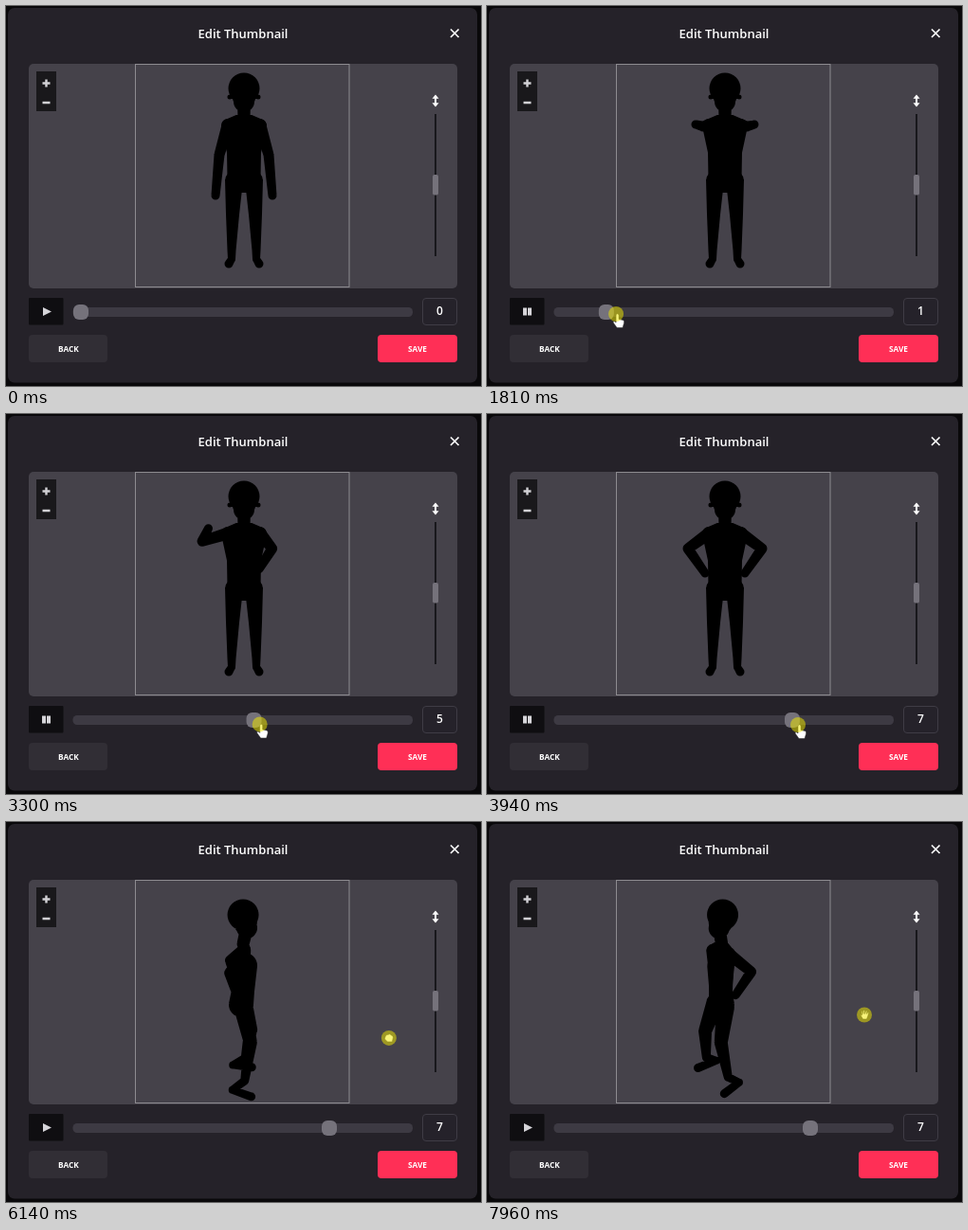
Animation, 501 px wide and 401 px high, one loop 8 s. Source, as an HTML page:

```html
<!DOCTYPE html>
<html lang="en">
<head>
<meta charset="utf-8">
<title>Edit Thumbnail</title>
<style>
  html, body { margin: 0; width: 100%; height: 100%; overflow: hidden; background: #09080a; }
  svg { display: block; width: 501px; height: 401px; }
  text { font-family: "Open Sans", "Noto Sans", sans-serif; fill: #fff; text-anchor: middle; }
  .button { font-size: 8.3px; font-weight: 700; }
</style>
</head>
<body>
<svg viewBox="0 0 501 401">
  <rect x="2" y="2" width="495" height="395.500" rx="7" fill="#252229"/>
  <text x="250" y="34" font-size="13" font-weight="600">Edit Thumbnail</text>
  <path d="M469 24.500l8.500 8.500m0-8.500l-8.500 8.500" stroke="#fff" stroke-width="1.700"/>

  <rect x="24" y="61" width="452" height="237" rx="5" fill="#45424a"/>
  <rect x="136.500" y="61.500" width="225.500" height="235" fill="none" stroke="#8d8b90"/>
  <rect x="32" y="69" width="21" height="42" fill="#19181b"/>
  <path d="M38.500 81.500h8M42.500 77.500v8M38.500 102h8" stroke="#d2d1d5" stroke-width="2.400"/>

  <path d="M453 93.500l3.500 4.300h-2.500v4.400h2.500l-3.500 4.300l-3.500-4.300h2.500v-4.400h-2.500z" fill="#fff"/>
  <path d="M453 114v150" stroke="#19181c" stroke-width="2"/>
  <rect x="450" y="178" width="6" height="21.500" rx="2" fill="#75727b"/>

  <path id="torso" stroke="#000" stroke-width="14" stroke-linejoin="round"/>
  <path id="limbs"/>

  <rect x="24" y="308" width="36.500" height="28.500" rx="1" fill="#0f0e11"/>
  <path id="toggle" fill="#d6d5d9"/>
  <rect x="70.500" y="318" width="358.500" height="10" rx="4.500" fill="#3d3a43"/>
  <rect id="knob" y="315" width="16" height="16" rx="6" fill="#75727b"/>
  <rect x="439.500" y="308.500" width="36" height="28" rx="3.500" fill="#25222a" stroke="#3f3c45"/>
  <text id="count" x="457.500" y="326.300" font-size="12" font-weight="600"></text>

  <rect x="24" y="347" width="83" height="29" rx="4" fill="#312e35"/>
  <text class="button" x="66" y="364.800">BACK</text>
  <rect x="392" y="347" width="84" height="29" rx="4" fill="#ff2f56"/>
  <text class="button" x="434" y="364.800">SAVE</text>

  <g id="cursor">
    <path id="pointer" fill="#fff" stroke="#222" stroke-width=".5"/>
    <circle id="press" r="8" fill="#f0e800" fill-opacity=".52"/>
  </g>
</svg>
<script>
const DURATION = 8000;
const scrub = { start: 1450, end: 4500, lag: 65 };
const turns = [{ start: 5450, end: 6850 }, { start: 7250, end: DURATION }];
const RADIANS_PER_PIXEL = 1.4 * Math.PI / 180;

const $ = id => document.getElementById(id);
const clamp = (v, low, high) => Math.min(high, Math.max(low, v));
const ease = u => u * u * (3 - 2 * u);
const during = ({ start, end }, t) => t >= start && t < end;

// One half of the body, [outward, down, forward]; the other half is mirrored.
const body = {
  skull: [0, 87, 2], jaw: [0, 101, 6], ear: [15, 96, 2], neck: [0, 118, 2],
  chest: [0, 141, 3], belly: [0, 168, 2], pelvis: [0, 184, 0],
  shoulder: [17, 126, 3], waist: [11, 154, 2], hip: [10.5, 184, 2],
  knee: [12, 220, 10], ankle: [13, 258, 4], heel: [13, 267, -9], toe: [16, 272, 11]
};

// Elbow and hand of each way to hold an arm.
const hold = {
  down: [[26, 157, 0], [30, 200, 2]],
  forward: [[23, 127, 25], [31, 125, 48]],
  raised: [[48, 128, 0], [51, 82, 4]],
  tucked: [[22, 142, -8], [12, 160, -8]],
  onHip: [[39, 142, -12], [21, 168, -4]]
};
const armTrack = [[1450, "down", "down"], [1810, "forward", "forward"],
  [2780, "raised", "tucked"], [3940, "onHip", "onHip"]]
  .map(([t, left, right]) => [t, [...hold[left], ...hold[right]].flat()]);

// Bones with the radius at each end.
const bones = [
  ["skull", "jaw", 16.5, 11], ["ear", "ear", 2.5, 2.5], ["jaw", "neck", 7, 6.5],
  ["chest", "belly", 14, 12], ["belly", "pelvis", 12, 13],
  ["neck", "shoulder", 6, 6.5], ["shoulder", "elbow", 6.5, 5.5], ["elbow", "hand", 5.5, 4.5],
  ["hip", "knee", 9.5, 7], ["knee", "ankle", 7, 4.5], ["ankle", "heel", 4.5, 4], ["heel", "toe", 4, 4.5]
];

const cursorTrack = [[510, [477, 400]], [1190, [79, 325]], [1450, [79, 325]], [1810, [136, 325]],
  [2780, [218.5, 327]], [3940, [328, 328]], [4500, [341, 331]], [4800, [341, 331]],
  [5450, [340, 222]], [6200, [405, 228]], [6850, [456, 222]], [7250, [300, 206]], [7960, [398, 203.5]]];

const shapes = {
  arrow: "M0 0v11l2.600-2.300l2 4.300l2-1l-2-4h3.400z",
  finger: "M0 1Q1.500-1.500 3 1V5.500l4.500 1q1.500.5 1 3l-1.500 5h-6l-4-5.500q0-2 2-1l1 1z",
  fist: "M-4-1q1-3 3-2.500q2-1.500 3.500.5q2 0 2 2.500l-1 4.500h-5l-3-3z",
  palm: "M-4.500-.5l2 .8l-.5-4.300h1.200l.7 3v-4h1.300l.4 4l1-3.500h1.200l-.3 3.500l1.300-2h1l-1 4l-1.300 3.500h-4z"
};
const playIcon = "M39 318l9 4.500l-9 4.500z";
const pauseIcon = "M38 318.500h4v8h-4zM43 318.500h4v8h-4z";

function sample(track, t, easing = u => u) {
  const next = track.findIndex(key => key[0] > t);
  if (next === 0) return track[0][1];
  if (next < 0) return track[track.length - 1][1];
  const [t0, from] = track[next - 1], [t1, to] = track[next];
  const u = easing((t - t0) / (t1 - t0));
  return from.map((v, i) => v + (to[i] - v) * u);
}

const cursorAt = t => sample(cursorTrack, t, during(scrub, t) ? undefined : ease);

// Each drag turns the figure by the distance the cursor covers.
const yawAt = t => RADIANS_PER_PIXEL * turns.reduce((sum, { start, end }) =>
  sum + cursorAt(clamp(t, start, end))[0] - cursorAt(start)[0], 0);

function jointFinder(t) {
  const arms = sample(armTrack, t);
  const stance = ease(clamp((t - 3940) / 560, 0, 1));
  const yaw = yawAt(t), pitch = .55 * Math.min(1, yaw / (Math.PI / 2));
  const centre = 251 - 3 * stance;

  return (name, side) => {
    const offset = (side < 0 ? 0 : 6) + (name === "hand" ? 3 : 0);
    const [out, down, z] = body[name] || arms.slice(offset, offset + 3);
    // Legs spread, the body sinks and leans as the stance widens.
    const spread = 11 * Math.max(0, (down - 184) / 80);
    const y = down + stance * 11 * Math.min(1, (272 - down) / 110);
    const x = side * (out + stance * spread) + stance * .05 * (190 - y);
    const depth = z * Math.cos(yaw) - x * Math.sin(yaw);
    return [centre + x * Math.cos(yaw) + z * Math.sin(yaw), y + depth * pitch * (y - 100) / 170];
  };
}

const disc = ([x, y], r) => `M${x - r} ${y}a${r} ${r} 0 1 1 ${2 * r} 0a${r} ${r} 0 1 1 ${-2 * r} 0z`;

function bonePath(a, b, ra, rb) {
  const dx = b[0] - a[0], dy = b[1] - a[1], length = Math.hypot(dx, dy) || 1;
  const edge = ([x, y], r) => `${x + dy / length * r} ${y - dx / length * r}`;
  return disc(a, ra) + disc(b, rb) +
    `M${edge(a, ra)}L${edge(b, rb)}L${edge(b, -rb)}L${edge(a, -ra)}z`;
}

function drawFigure(t) {
  const joint = jointFinder(t);
  const outline = side => ["shoulder", "waist", "hip"].map(name => joint(name, side));
  $("torso").setAttribute("d", "M" + [...outline(-1), ...outline(1).reverse()].join("L") + "z");
  $("limbs").setAttribute("d", [-1, 1].flatMap(side => bones.map(([a, b, ra, rb]) =>
    bonePath(joint(a, side), joint(b, side), ra, rb))).join(""));
}

function drawCursor(t) {
  const orbiting = t >= turns[0].start;
  const pressed = [scrub, ...turns].some(drag => during(drag, t));
  const shape = orbiting ? (during(turns[0], t) ? "fist" : "palm")
    : t >= 1190 && t < scrub.end ? "finger" : "arrow";
  $("cursor").setAttribute("visibility", t < 510 ? "hidden" : "visible");
  $("cursor").setAttribute("transform", `translate(${cursorAt(t)})`);
  $("pointer").setAttribute("d", shapes[shape]);
  $("press").setAttribute("visibility", pressed ? "inherit" : "hidden");
}

function drawSlider(t) {
  const x = cursorAt(clamp(t - scrub.lag, scrub.start, scrub.end))[0];
  $("knob").setAttribute("x", x - 8);
  $("count").textContent = Math.floor((x - 79) / 33.3);
  $("toggle").setAttribute("d", during(scrub, t) ? pauseIcon : playIcon);
}

function render(now) {
  const t = now % DURATION;
  drawFigure(t);
  drawSlider(t);
  drawCursor(t);
  requestAnimationFrame(render);
}
requestAnimationFrame(render);
</script>
</body>
</html>
```
